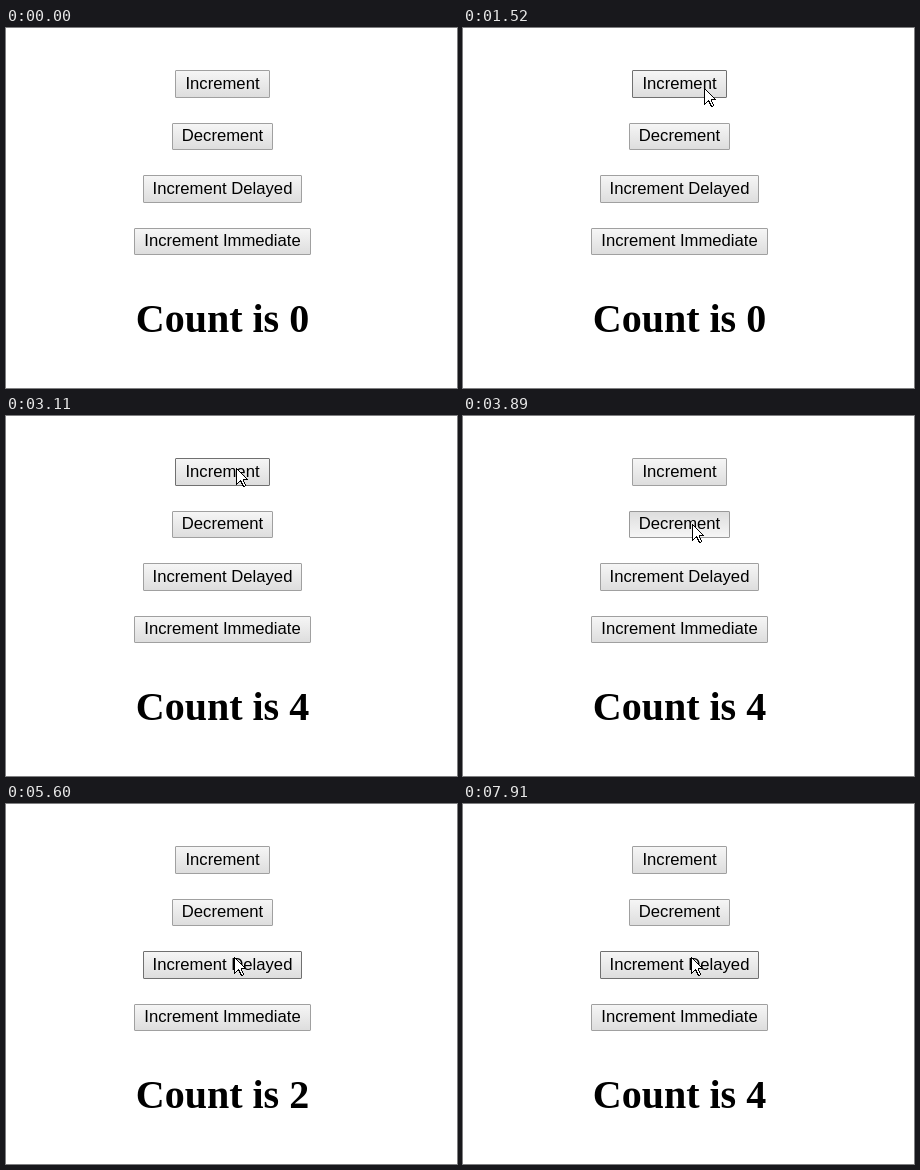
An HTML page for the animation above (8 s loop, 451x360 px).

```html
<!DOCTYPE html>
<html lang="en">
<head>
<meta charset="utf-8">
<title>Counter</title>
<style>
html, body { margin: 0; width: 100%; height: 100%; overflow: hidden; background: #fff; }
svg { display: block; }
.button rect { fill: url(#up); stroke: #a0a0a0; }
.button.hover rect { stroke: #707070; }
.button.pressed rect { fill: url(#down); stroke: #999; }
.button text { font: 16.667px "Liberation Sans", Arial, sans-serif; text-anchor: middle; }
#count { font: bold 40px "Liberation Serif", "Times New Roman", serif; }
</style>
</head>
<body>
<svg id="stage" width="451" height="360" viewBox="0 0 451 360">
  <defs>
    <linearGradient id="up" x2="0" y2="1">
      <stop stop-color="#f6f6f6"/><stop offset="1" stop-color="#ddd"/>
    </linearGradient>
    <linearGradient id="down" x2="0" y2="1">
      <stop stop-color="#ddd"/><stop offset="1" stop-color="#f6f6f6"/>
    </linearGradient>
  </defs>
  <g id="buttons"></g>
  <text id="count" x="129.8" y="304">Count is 0</text>
  <path id="cursor" fill="#fff" stroke="#000" shape-rendering="crispEdges"
    d="M.5 .5V16.5L4.5 12.5L7.5 18.5H8.5L9.5 17.5L7.5 12.5V11.5H11.5Z"/>
</svg>
<script>
const LOOP = 8000;
const SHOW_CURSOR = 250;

// label, left, top, width, height, baseline
const BUTTONS = [
  ["Increment", 169, 42, 95, 28, 61],
  ["Decrement", 166, 95, 101, 27, 113],
  ["Increment Delayed", 137, 147, 159, 28, 166],
  ["Increment Immediate", 128, 200, 177, 27, 218]
];

const linear = p => p;
const easeOut = p => 1 - (1 - p) ** 2;
const easeInOut = p => p * p * (3 - 2 * p);

// first step, last step, number of steps, end x, end y, easing
const START = [367, 354];
const MOVES = [
  [250, 870, 11, 345, 167, linear],
  [970, 1030, 2, 313, 113, linear],
  [1130, 1780, 11, 230, 52, easeOut],
  [3470, 3790, 8, 229, 108, easeInOut],
  [4660, 4760, 2, 228, 114, linear],
  [4790, 5410, 10, 228, 153, easeInOut]
];

// press, release
const CLICKS = [
  [2270, 2370], [2520, 2540], [3070, 3110],
  [3870, 3950], [4340, 4400], [5540, 5600], [6860, 6940]
];

// time, value
const COUNTS = [
  [0, 0], [2370, 1], [2540, 2], [2930, 3], [3110, 4],
  [3950, 3], [4400, 2], [6570, 3], [7910, 4]
];

const count = document.getElementById("count");
const cursor = document.getElementById("cursor");

function add(parent, name, attrs) {
  const node = document.createElementNS("http://www.w3.org/2000/svg", name);
  for (const key in attrs) node.setAttribute(key, attrs[key]);
  return parent.appendChild(node);
}

const buttons = BUTTONS.map(([label, x, y, w, h, base]) => {
  const node = add(document.getElementById("buttons"), "g", { class: "button" });
  add(node, "rect", { x: x + .5, y: y + .5, width: w - 1, height: h - 1, rx: .5 });
  add(node, "text", { x: 216.5, y: base }).textContent = label;
  return { node, contains: (px, py) => px >= x && px < x + w && py >= y && py < y + h };
});

function cursorAt(t) {
  let [x, y] = START;
  for (const [from, to, steps, endX, endY, ease] of MOVES) {
    if (t < from) break;
    const gap = (to - from) / (steps - 1);
    const step = Math.min(steps, Math.floor((t - from) / gap + 1e-6) + 1);
    const p = ease(step / steps);
    x += (endX - x) * p;
    y += (endY - y) * p;
  }
  return [Math.round(x), Math.round(y)];
}

function draw(t) {
  const [x, y] = cursorAt(t);
  const visible = t >= SHOW_CURSOR;
  const down = CLICKS.some(([press, release]) => t >= press && t < release);

  cursor.setAttribute("transform", `translate(${x} ${y})`);
  cursor.setAttribute("visibility", visible ? "visible" : "hidden");
  for (const { node, contains } of buttons) {
    const over = visible && contains(x, y);
    node.classList.toggle("hover", over);
    node.classList.toggle("pressed", over && down);
  }
  const value = COUNTS.filter(([time]) => time <= t).pop()[1];
  count.textContent = "Count is " + value;
}

function tick() {
  draw(performance.now() % LOOP);
  requestAnimationFrame(tick);
}
tick();
</script>
</body>
</html>
```
